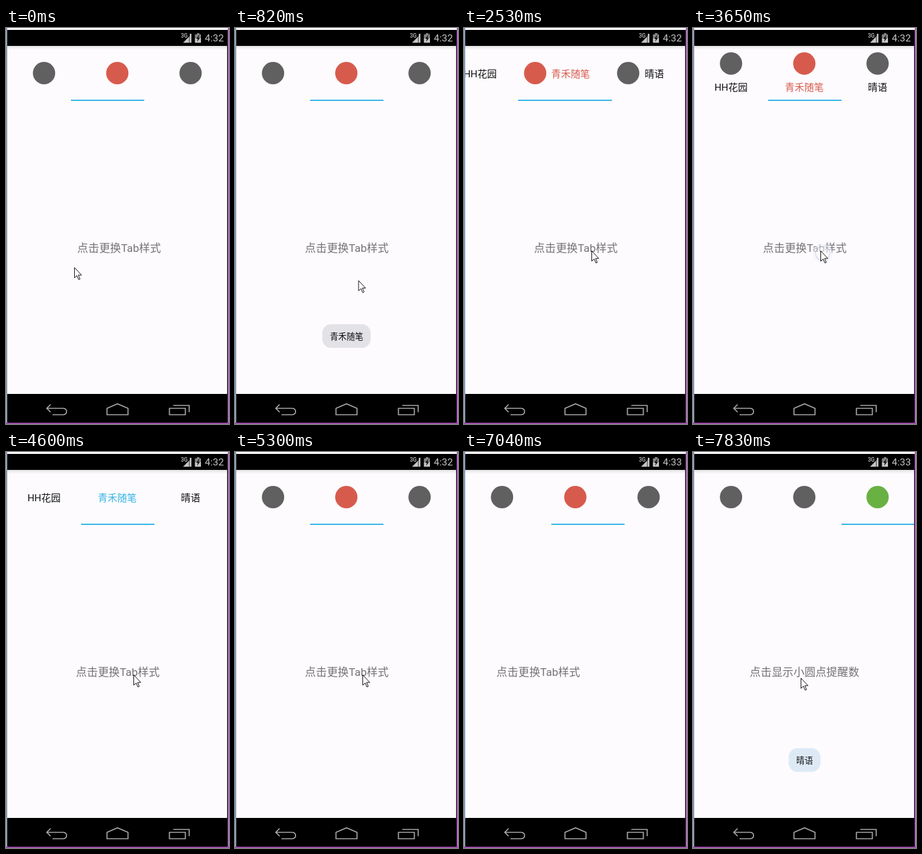
An HTML page that plays this animation: 350x619 px, repeating every 7990 ms.

```html
<!DOCTYPE html>
<html lang="zh">
<head>
<meta charset="utf-8">
<title>Tab styles</title>
<style>
  html, body { margin: 0; width: 100%; height: 100%; overflow: hidden; background: #fdfbfe; }
  svg { display: block; width: 350px; height: 619px; }
  text { font-family: Roboto, "Noto Sans CJK SC", "Noto Sans CJK", sans-serif; }
  .tab text { font-size: 15.2px; }
  .page { font-size: 17.2px; fill: #747275; text-anchor: middle; }
  .toast text { font-size: 13.1px; text-anchor: middle; }
  .nav { fill: none; stroke: #a8a8a8; stroke-width: 1.7; }
</style>
</head>
<body>
<svg viewBox="0 0 350 619">
  <defs>
    <clipPath id="screen"><rect x="2" y="28" width="345" height="544"/></clipPath>
    <linearGradient id="shade" x2="0" y2="1">
      <stop stop-color="#e2e1e4"/><stop offset="1" stop-color="#fdfbfe"/>
    </linearGradient>
  </defs>

  <rect width="350" height="619" fill="#fdfbfe"/>
  <rect x="2" y="28" width="345" height="6" fill="url(#shade)"/>

  <g clip-path="url(#screen)">
    <g id="tabs"></g>
    <rect id="bar" y="112" height="2" fill="#33b5e5"/>
    <text class="page" id="page1" y="350">点击更换Tab样式</text>
    <text class="page" id="page2" y="350">点击显示小圆点提醒数</text>
    <g class="toast" id="toast">
      <rect y="463" height="37" rx="14"/>
      <text x="175.2" y="487"></text>
    </g>
    <g id="touch">
      <circle r="15.5" fill="#f2f3fa"/>
      <circle r="11" fill="#fdfcff" stroke="#b9bfe2" stroke-width="1.2"/>
    </g>
  </g>

  <rect x="2" y="3" width="346" height="25"/>
  <rect x="2" y="572" width="346" height="46"/>
  <rect width="2" height="619" fill="#8d9db3"/>
  <rect x="347" y="3" width="1" height="614"/>
  <rect x="348" width="2" height="619" fill="#b066ba"/>
  <rect y="617" width="350" height="2" fill="#a04fac"/>

  <g fill="#c4c4c4">
    <text x="274.5" y="15" font-size="8.500" font-weight="500">3G</text>
    <path d="M278 23L291 10V23Z" fill="#6a6a6a"/>
    <path d="M278 23L287 14V23ZM288.500 9H291V23H288.500Z"/>
    <path d="M299.500 8H303.500V10H306V16H296.500V10H299.500Z" fill="#858585"/>
    <path d="M296.500 16H306V23H296.500Z"/>
    <path d="M302.500 11.500L298.500 17H301L300 21.500L304.500 15.500H302L303.500 11.500Z" fill="#111"/>
    <text id="clock" x="312" y="21" font-size="15.500"></text>
  </g>

  <g class="nav">
    <path d="M70 588.500L64 594.500L70 600.500M64 594.500H90Q95 595 95 599.500T90 604.500H73"/>
    <path d="M158.500 604.500V594.500L175 587.500L191.500 594.500V604.500Z"/>
    <path d="M256.500 594.500H281.500V604.500H256.500ZM262.500 590H287.500V600.500"/>
  </g>

  <path id="cursor" d="M.5.5V16.500L4.300 13L7 19.300L9.200 18.300L6.500 12.200H11.500Z" fill="#fff" stroke="#111"/>
</svg>

<script>
const LOOP = 7990, TICK = 133.2; // the screen refreshes once per tick
const GREY = '#606060', BLUE = '#33b5e5';
const TABS = [
  { name: 'HH花园', tint: GREY },
  { name: '青禾随笔', tint: '#d75b4d', toast: '#e2e2e6', width: 76 },
  { name: '晴语', tint: '#69b143', toast: '#dceaf6', width: 50 }
];
const CENTERS = [59.7, 174.7, 289.7];
const LAYOUTS = {
  icon: { icons: CENTERS, iconY: 70.5 },
  row: { icons: [-25, 111.7, 257.7], iconY: 70.5, labels: [-.5, 137, 283.5], labelY: 77 },
  stack: { icons: CENTERS, iconY: 55.5, labels: CENTERS, labelY: 98 },
  text: { labels: CENTERS, labelY: 77 }
};
const TAPS = [
  { down: 2260, change: 2380, style: 'row' },
  { down: 3500, change: 3500, style: 'stack' },
  { down: 4330, change: 4450, style: 'text' },
  { down: 5030, change: 5300, style: 'icon' }
];
const TAP_TIME = 270, DRAG = 6260, FLING = 7060;

// Turning points of the mouse path: time, x, y
const PATH = [
  [0, 107, 374], [266, 118, 374], [532, 130, 383], [932, 225, 400], [1200, 274, 372],
  [1598, 209, 339], [1730, 272, 353], [1870, 248, 384], [2130, 200, 348], [5860, 200, 348],
  [6260, 258, 424], [6400, 222, 424], [6660, 20, 424], [7550, 138, 380], [7858, 169, 353]
];

const $ = id => document.getElementById(id);
const set = (el, attrs) => { for (const k in attrs) el.setAttribute(k, attrs[k]); };
const ramp = (t, from, to) => Math.min(1, Math.max(0, (t - from) / (to - from)));
const mix = (a, b, k) => a + (b - a) * k;
const easeOut = k => 1 - (1 - k) ** 2;

function pathAt(t) {
  const i = Math.max(1, PATH.findIndex(p => p[0] > t));
  if (t >= PATH.at(-1)[0]) return PATH.at(-1).slice(1);
  const [a, b] = [PATH[i - 1], PATH[i]], k = ramp(t, a[0], b[0]);
  return [mix(a[1], b[1], k), mix(a[2], b[2], k)];
}

const toastAlpha = age => ramp(age, 0, 700) * (1 - ramp(age, 810, 1570) ** 3);
const scrollAt = t => -2 * (1 - ramp(t, 0, 200))
  + 59 * ramp(t, 6527, FLING) + 287 * easeOut(ramp(t, FLING, 7470));

const tabs = TABS.map(({ name }) => {
  const make = tag => document.createElementNS('http://www.w3.org/2000/svg', tag);
  const group = make('g'), icon = make('circle'), label = make('text');
  set(group, { class: 'tab' });
  set(icon, { r: 17.5 });
  label.textContent = name;
  group.append(icon, label);
  $('tabs').append(group);
  return { icon, label };
});

function drawTabs(style, active) {
  const { icons, iconY, labels, labelY } = LAYOUTS[style];
  tabs.forEach(({ icon, label }, i) => {
    const on = i === active, { tint } = TABS[i];
    icon.style.display = icons ? '' : 'none';
    label.style.display = labels ? '' : 'none';
    if (icons) set(icon, { cx: icons[i], cy: iconY, fill: on ? tint : GREY });
    if (labels) set(label, {
      x: labels[i], y: labelY,
      'text-anchor': style === 'row' ? 'start' : 'middle',
      fill: !on ? '#111' : style === 'text' ? BLUE : tint
    });
  });
}

function drawToast(age, { name, toast, width }) {
  const [box, label] = $('toast').children;
  set(box, { x: 175 - width / 2, width, fill: toast });
  label.textContent = name;
  set($('toast'), { opacity: toastAlpha(age) });
}

function drawTouch(t, now) {
  const tap = TAPS.find(({ down }) => t >= down && t < down + TAP_TIME);
  let x = 203.5, y = 352.5, opacity = 0;
  if (tap) opacity = 1 - .8 * ramp(t, tap.down, tap.down + TAP_TIME);
  else if (t >= DRAG) {
    x = 262 + 4 * ramp(now, DRAG, 6400) - 16 * ramp(now, 6530, 6800);
    y = 432;
    opacity = 1 - ramp(now, 6660, FLING);
  }
  set($('touch'), { transform: `translate(${x} ${y})`, opacity });
}

function draw(t) {
  const now = Math.floor((t + 35) / TICK) * TICK;
  const style = TAPS.findLast(({ change }) => t >= change)?.style ?? 'icon';
  const wide = style === 'row', scroll = scrollAt(now);
  const active = t < 7190 ? 1 : 2;

  drawTabs(style, active);
  drawToast(now - (active === 1 ? 130 : 7200), TABS[active]);
  drawTouch(t, now);

  const settle = 16 * (1 - ramp(now, 0, 200)) ** 2;
  const barX = Math.floor(118 - settle + Math.max(0, scroll) / 3);
  set($('bar'), { x: wide ? 85 : barX, width: wide ? 147 : 115 });
  set($('page1'), { x: 175.5 - scroll });
  set($('page2'), { x: 521 - scroll });

  const away = t >= 6800 && t < 7560;
  set($('cursor'), { transform: `translate(${pathAt(now)})`, opacity: away ? 0 : 1 });
  $('clock').textContent = t < 6800 ? '4:32' : '4:33';
}

const start = performance.now();
function tick() {
  draw((performance.now() - start) % LOOP);
  requestAnimationFrame(tick);
}
tick();
</script>
</body>
</html>
```
